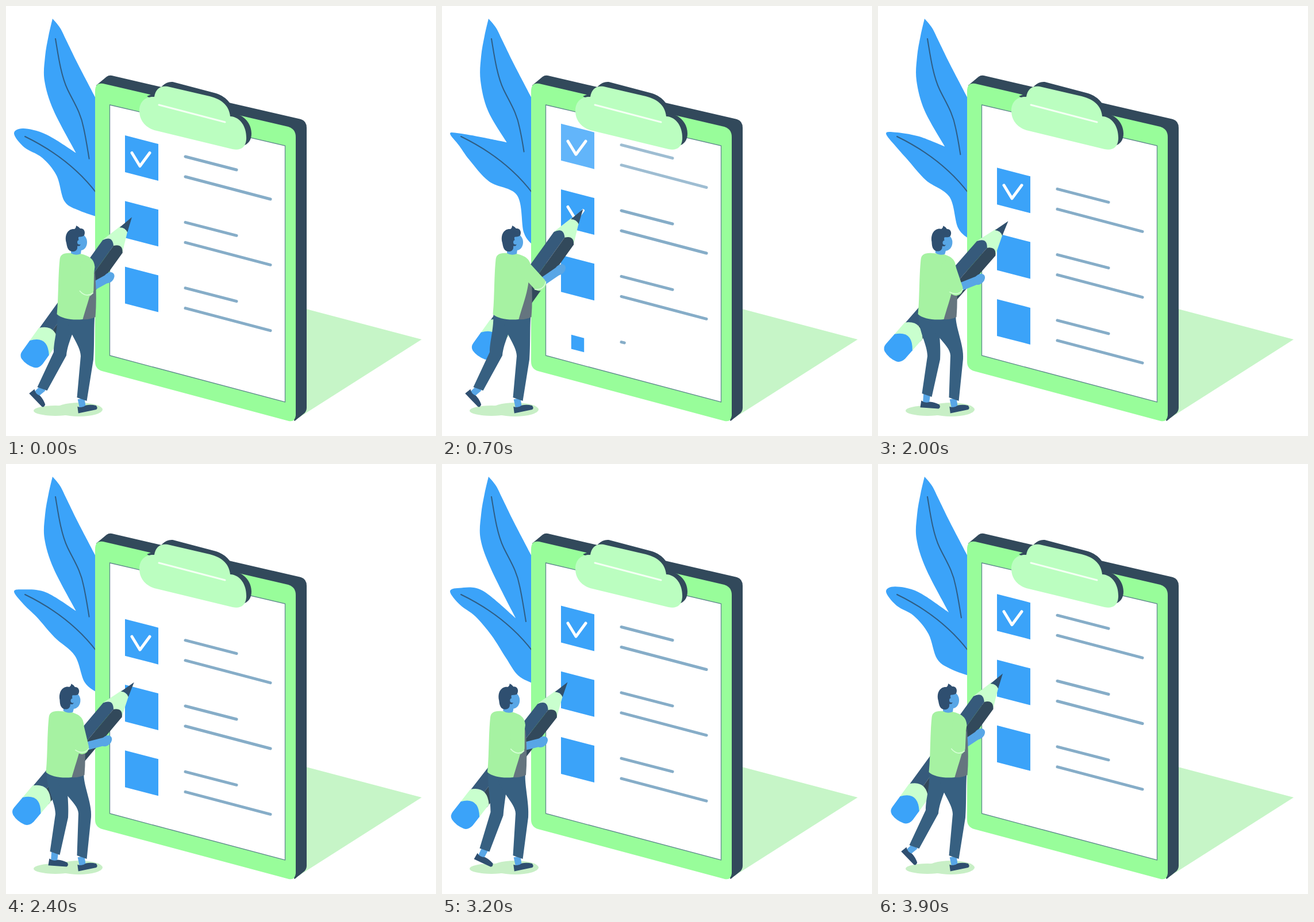
These frames come from a looping animation (748 by 748 pixels, 4 s). An HTML page:

```html
<!DOCTYPE html>
<html lang="en">
<head>
<meta charset="utf-8">
<title>Checklist</title>
<style>
html, body { margin: 0; width: 100%; height: 100%; overflow: hidden; background: #fff; }
svg { display: block; width: 100vw; height: 100vh; }
.blue { fill: #3ba3f9; }
.navy { fill: #32495b; }
.pants { fill: #376081; }
.shoe { fill: #2f4f70; }
.skin { fill: #58a6e6; }
.mint { fill: #c9ffce; }
.shirt { fill: #a6f2a2; }
.line { fill: none; stroke-linecap: round; stroke-linejoin: round; }
.ink { stroke: #86adc8; stroke-width: 5; }
.vein { stroke: #2f5d84; stroke-width: 2; }
.tick { stroke: #fff; stroke-width: 5; }
</style>
</head>
<body>
<svg viewBox="0 0 748 748">
  <path fill="#c6f5c7" d="M522 527L723 580L506 718Z"/>
  <path id="leaf" class="blue"/>
  <path id="vein" class="line vein"/>
  <path class="line vein" d="M33 227C70 245 118 274 157 325"/>

  <path class="navy" d="M157 138L175 123Q179 120 184 121L513 197Q523 200 523 212V699Q523 706 517 710L502 722Z"/>
  <path fill="#98fd9a" d="M155 148Q155 133 169 135L491 210Q504 214 504 228V712Q503 724 492 722L167 635Q155 631 155 619Z"/>
  <path fill="#fff" stroke="#5f8a8c" stroke-width="1.3" d="M180.500 172L485.500 243V689L180.500 608Z"/>
  <g id="rows"></g>

  <path class="navy" d="M245 157L262 150L272 139Q280 131 290 132L362 151C382 156 394 170 397 187C415 190 427 205 427 222C427 233 422 240 411 244Z"/>
  <path fill="#bbfec0" d="M232 182C232 166 243 157 258 158C260 145 268 138 281 140L350 156C374 161 388 172 390 192C409 193 419 212 418 232C417 246 408 252 394 249L262 217C244 213 232 200 232 182Z"/>
  <path class="line" stroke="#f4fff4" stroke-width="3" d="M266 172L381 202"/>

  <g fill="#c8efc6">
    <ellipse cx="86" cy="704" rx="38" ry="9"/>
    <ellipse cx="127" cy="702" rx="41" ry="12"/>
  </g>

  <g id="pencil">
    <path class="mint" d="M-18 61L-7 24H8L23 61Z"/>
    <path fill="#30506d" d="M0 0L-7 27Q1 21 9 26Z"/>
    <path fill="#365a7b" d="M-18 62Q-9 45 3 59V258H-18Z"/>
    <path class="navy" d="M3 59Q14 46 23 60V258H3Z"/>
    <path class="mint" d="M-19 251Q1 228 23 252V280H-19Z"/>
    <path class="blue" d="M-19 278Q1 252 23 279V298Q22 309 14 312Q0 316 -12 312Q-19 309 -19 301Z"/>
  </g>

  <g id="backFoot">
    <path class="skin" d="M-6 -2H6L5 14H-6Z"/>
    <path class="shoe" d="M-9 10Q-2 15 6 11Q14 11 23 15Q26 20 22 22H-10Z"/>
  </g>
  <g id="frontFoot" transform="translate(131 685) rotate(-12)"></g>
  <path id="backLeg" class="pants"/>
  <path id="frontLeg" class="pants"/>

  <path id="forearm" class="line" stroke="#58a6e6" stroke-width="14"/>
  <ellipse id="hand" class="skin" rx="11" ry="8"/>
  <g id="torso">
    <path fill="#65757f" d="M131 545L147 487L153 460Q157 505 154 541Q145 546 131 545Z"/>
    <path class="shirt" d="M112 430C99 429 93 432 92 441C89 470 90 505 87 536C95 544 115 547 132 545C139 520 145 505 148 487L153 454C152 441 145 435 128 431Z"/>
  </g>
  <path id="sleeve" class="line" stroke="#a6f2a2" stroke-width="24"/>
  <path id="cuff" class="line" stroke="#d6ffd6" stroke-width="1.6" d="M-12 2Q-1 14 11 5"/>
  <g id="head">
    <path class="skin" d="M113 415L131 418L129 431Q120 435 112 430Z"/>
    <ellipse class="skin" cx="129" cy="411" rx="11" ry="14"/>
    <path class="shoe" d="M104 412C100 398 107 387 118 388Q121 386 121 382Q126 384 128 387C134 386 138 392 135 399C132 402 128 401 125 402C124 410 130 408 129 414C127 420 124 416 123 418C124 424 120 428 113 427C106 425 105 418 104 412Z"/>
    <circle class="skin" cx="127" cy="411" r="4"/>
  </g>
</svg>
<script>
const LOOP = 4000, STEP = 100, GAP = 114.3;
const $ = id => document.getElementById(id);
const set = (id, d) => $(id).setAttribute('d', d);
const move = (id, tr) => $(id).setAttribute('transform', tr);

const clamp = x => Math.max(0, Math.min(1, x));
const ramp = (t, a, b) => clamp((t - a) / (b - a));
const ease = (t, a, b) => { const x = ramp(t, a, b); return x * x * (3 - 2 * x); };
const mix = (a, b, p) => a + (b - a) * p;
const blend = (a, b, p) => a.map((v, i) => mix(v, b[i], p));

// Top of a checklist row, sliding up one gap per loop.
const rowTop = (k, t) => 225 + GAP * k - 0.029 * t;

// Progress along the two strokes of the tick drawn in row 1.
const strokes = p => [clamp(p / 0.47), clamp((p - 0.47) / 0.53)];
const tickProgress = t => ramp(t, 100, 800);

const rows = [0, 1, 2, 3].map(() => {
  const g = document.createElementNS('http://www.w3.org/2000/svg', 'g');
  g.innerHTML = '<path class="blue" d="M207 0L265 15V79L207 64Z"/>' +
    '<path class="line tick"/><path class="line ink"/><path class="line ink"/>';
  $('rows').append(g);
  return g;
});
$('frontFoot').innerHTML = $('backFoot').innerHTML;

const part = (x, y, dx, dy, p) => p > 0 ? `M${x} ${y}l${dx * p} ${dy * p}` : '';

function drawRows(t) {
  rows.forEach((g, k) => {
    const [box, tick, top, low] = g.children;
    const fresh = k === 3;
    const grow = fresh ? 1 - (1 - ramp(t, 640, 1040)) ** 3 : 1;
    const [a, b] = strokes(k === 0 ? 1 : k === 1 ? tickProgress(t) : 0);
    g.setAttribute('transform', `translate(0 ${rowTop(k, t)})`);
    g.setAttribute('opacity', k ? 1 : 1 - ramp(t, 580, 1180));
    box.setAttribute('transform', `translate(236 39.5) scale(${grow}) translate(-236 -39.5)`);
    tick.setAttribute('d', a ? `M219 30.5l${14 * a} ${23 * a}l${17 * b} ${-23 * b}` : '');
    top.setAttribute('d', part(312, 37, 89, 23, fresh ? ramp(t, 660, 1340) : 1));
    low.setAttribute('d', part(312, 72, 148, 39, fresh ? ramp(t, 860, 1470) : 1));
  });
}

// Curve segments through points, starting at the first one.
function curve(pts) {
  let d = '';
  for (let i = 0; i < pts.length - 1; i++) {
    const a = pts[i], b = pts[i + 1], p = pts[i - 1] || a, q = pts[i + 2] || b;
    d += `C${a.map((v, c) => v + (b[c] - p[c]) / 6)} ${b.map((v, c) => v - (q[c] - a[c]) / 6)} ${b}`;
  }
  return d;
}

const OPEN = [[32, 246], [63, 264], [88, 295], [102, 340], [128, 356], [160, 367]];
const FOLDED = [[30, 243], [47, 268], [82, 306], [132, 329], [143, 396], [160, 420]];
const RIGHT = [[160, 168], [138, 126], [122, 95], [105, 60], [94, 38], [81, 22]];

// The low leaf folds quickly and opens slowly, the fork swings once per loop.
function drawLeaf(t) {
  const fold = ease(t, 0, 800) * (1 - ramp(t, 1300, LOOP));
  const wave = Math.cos(2 * Math.PI * (t - 3200) / LOOP);
  const fork = [119 + 9 * wave, 250 + 18 * wave];
  const round = 9 * (1 - fold);
  const low = OPEN.map((p, i) => blend(p, FOLDED[i], fold));
  set('leaf', 'M81 22' +
    curve([[81, 22], [74, 52], [68, 88], [67, 130], [82 + 3 * wave, 182], fork]) +
    curve([fork, [70, 225 - 5 * wave], [30, 222 - round], [14, 222], ...low]) +
    'L160 168' + curve(RIGHT) + 'Z');
  set('vein', `M86 57C90 80 95 120 107 145C118 168 130 185 135 212Q139 230 ${144 + 2 * wave} ${262 + 12 * wave}`);
}

// The pencil rides the tick, then drifts back to the next row.
function pencilTip(t) {
  const [a, b] = strokes(tickProgress(t));
  const onTick = [219 + 14 * a + 17 * b, rowTop(1, t) + 28 + 23 * a - 23 * b];
  const back = blend(onTick, [233, 365], ease(t, 800, 1300));
  const down = blend(back, [219, 385], ramp(t, 1300, 2800));
  return blend(down, [217, 364], ease(t, 2800, LOOP));
}

// Elbow of a two-bone arm hanging below the line from shoulder to hand.
function bendArm([sx, sy], [hx, hy], upper, fore) {
  const dx = hx - sx, dy = hy - sy, d = Math.hypot(dx, dy);
  const along = (d * d + upper * upper - fore * fore) / (2 * d);
  const off = Math.sqrt(Math.max(0, upper * upper - along * along));
  return [sx + (dx * along - dy * off) / d, sy + (dy * along + dx * off) / d];
}

function leg(hipL, hipR, [kx, ky], [ax, ay]) {
  return `M${hipL}C${hipL[0]} ${hipL[1] + 30} ${kx - 11} ${ky - 22} ${kx - 11} ${ky - 2}` +
    `L${ax - 8.5} ${ay - 3}L${ax + 8.5} ${ay + 3}` +
    `L${kx + 11} ${ky + 4}C${kx + 13} ${ky - 20} ${hipR[0] - 2} ${hipR[1] + 20} ${hipR}Z`;
}

function drawMan(t) {
  const stand = ease(t, 800, 1900) - ease(t, 2800, 3600);
  const tx = 1.5 - 19 * stand;
  const angle = 35.7 + 7.5 * ease(t, 700, 1300) * (1 - ramp(t, 1300, LOOP));
  const sin = Math.sin(angle * Math.PI / 180), cos = Math.cos(angle * Math.PI / 180);
  const [px, py] = pencilTip(t);
  move('pencil', `translate(${px} ${py}) rotate(${angle})`);

  const hand = [px - 109 * sin + 29 * cos, py + 109 * cos + 29 * sin];
  const shoulder = [140 + tx, 453];
  const elbow = bendArm(shoulder, hand, 41, 44);
  const swing = Math.atan2(shoulder[0] - elbow[0], elbow[1] - shoulder[1]) * 180 / Math.PI;
  set('forearm', `M${elbow}L${hand}`);
  set('sleeve', `M${shoulder}L${elbow}`);
  move('hand', `translate(${hand}) rotate(-45)`);
  move('cuff', `translate(${elbow}) rotate(${swing})`);
  move('torso', `translate(${tx} 0)`);
  move('head', `translate(${1 - 13 * stand} 0) rotate(${6 * stand} 121 425)`);

  const ankle = blend([63, 666], [85, 677], stand);
  const hip = x => [x + tx, 537];
  set('backLeg', leg(hip(88), hip(124), blend([94, 604], [97, 611], stand), ankle));
  set('frontLeg', leg(hip(104), hip(153), blend([141, 611], [137, 610], stand), [132, 684]));
  move('backFoot', `translate(${ankle}) rotate(${mix(46, 4, stand)})`);
}

function draw(now) {
  const t = Math.floor(now % LOOP / STEP) * STEP;
  drawRows(t);
  drawLeaf(t);
  drawMan(t);
}

let start;
function loop(now) {
  start ??= now;
  draw(now - start);
  requestAnimationFrame(loop);
}
draw(0);
requestAnimationFrame(loop);
</script>
</body>
</html>
```
